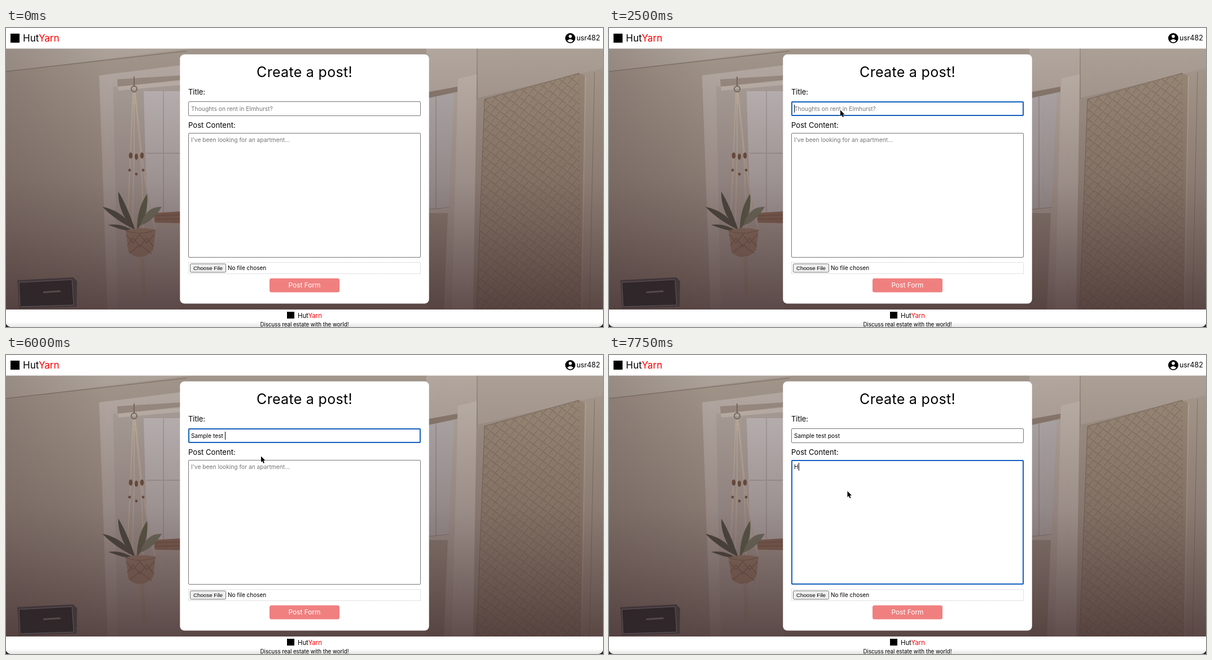
Write an HTML page that moves like this. It is 1058x530 px and loops after 8000 ms.

```html
<!DOCTYPE html>
<html lang="en">
<head>
<meta charset="utf-8">
<title>Create a post</title>
<style>
html, body { margin: 0; width: 100%; height: 100%; overflow: hidden; background: #fff; }
#stage { position: relative; width: 1058px; height: 530px; overflow: hidden; font-family: Inter, "Open Sans", sans-serif; }
svg { position: absolute; left: 0; top: 0; display: block; }
.field {
  position: absolute; left: 323px; width: 412px; box-sizing: border-box;
  border: 1px solid #767676; border-radius: 2px; background: #fff;
  font-size: 10.25px; line-height: 14px; white-space: pre; color: #000;
}
.field div { position: absolute; left: 4px; }
#title { top: 130px; height: 26px; }
#title div { top: 5px; }
#body { top: 186px; height: 221px; }
#body div { top: 4px; }
.focus::after {
  content: ""; position: absolute; inset: -1px;
  border: 2px solid #1460bd; border-radius: 2px;
}
.empty .text { color: #757575; }
.caret { position: absolute; top: 0; width: 1px; height: 14px; background: #000; visibility: hidden; }
.empty .caret { left: 0; }
.on .caret { visibility: visible; }
#cursor { width: 10px; height: 15px; overflow: visible; }
</style>
</head>
<body>
<div id="stage">
<svg width="1058" height="530" viewBox="0 0 1058 530">
  <defs>
    <linearGradient id="shade" x2="0" y2="1">
      <stop offset="0" stop-color="#4a3434" stop-opacity=".03"/>
      <stop offset=".5" stop-color="#4a3434" stop-opacity=".31"/>
      <stop offset="1" stop-color="#402c2d" stop-opacity=".76"/>
    </linearGradient>
    <linearGradient id="side">
      <stop offset="0" stop-color="#453332" stop-opacity=".2"/>
      <stop offset="1" stop-color="#453332" stop-opacity="0"/>
    </linearGradient>
    <linearGradient id="foot" x2="0" y2="1">
      <stop offset=".7" stop-color="#fff"/>
      <stop offset="1" stop-color="#e6e6e6"/>
    </linearGradient>
    <pattern id="weave" width="17" height="17" patternUnits="userSpaceOnUse" patternTransform="skewY(-14)">
      <path d="M0 0L17 17M17 0L0 17" stroke="#857564" stroke-width="3" stroke-opacity=".6"/>
      <path d="M0 -2L17 15M17 -2L0 15" stroke="#b5a490" stroke-opacity=".5"/>
    </pattern>
  </defs>

  <!-- room -->
  <path fill="#a4988d" d="M0 36H1058V500H0Z"/>
  <path fill="#b0a69d" d="M0 36H330L0 77Z"/>
  <path stroke="#786c64" d="M0 77L320 41"/>
  <path fill="#b9afa8" d="M165 84L310 66V500H180Z"/>
  <path fill="#afa59f" d="M190 104L310 96V500H198Z"/>
  <path fill="#c3bdbd" d="M244 112H310V330H250Z"/>
  <path fill="#9c8f84" d="M197 91L310 84V92L198 104Z"/>
  <path fill="#c2b8af" d="M198 104L310 94V101L199 111Z"/>
  <path stroke="#aea5a2" stroke-width="2" fill="none" d="M279 112V330M249 222H310"/>
  <path fill="#8c6a57" d="M262 328L310 325V346L264 345Z"/>
  <path stroke="#6d5145" d="M263 333L310 331M263 339L310 338"/>
  <path fill="#b2a79e" d="M262 346H310V354L262 353Z"/>
  <path fill="#b5aaa1" d="M745 36H835V500H745Z"/>
  <path fill="#b5b0b0" d="M745 124L794 116L784 320H745Z"/>
  <path fill="#8b7c70" d="M745 114L800 104V113L745 125Z"/>
  <path stroke="#8e827b" fill="none" d="M762 122V320M745 322L785 318"/>
  <path fill="#9b8e83" d="M745 328H783L776 500H745Z"/>
  <path fill="#c0b6ad" d="M801 90L835 82L828 500H790Z"/>
  <path fill="#a3978b" d="M835 36H1058V500H828Z"/>
  <path fill="#aea399" d="M835 36H1058V72L835 124Z"/>
  <path fill="#a99c8f" d="M1024 80L1058 72V500H1016Z"/>
  <path stroke="#85786d" fill="none" d="M835 36V126M1043 78L1034 500"/>

  <!-- woven panel -->
  <path fill="#9c8c7a" d="M848 126L1016 80L1027 86L1020 500H834Z"/>
  <path fill="url(#weave)" d="M848 126L1016 80L1019 500H834Z"/>
  <path fill="none" stroke="#7c6d60" d="M834 500L848 126L1016 80"/>
  <path stroke="#b8aa9b" stroke-width="2" d="M1027 86L1020 500"/>

  <!-- hanging plant -->
  <g fill="none" stroke="#c4b5a3" stroke-width="2">
    <circle cx="227" cy="108" r="5" stroke="#7b6b5f"/>
    <path d="M227 86V103" stroke="#776a62"/>
    <path d="M225 115C222 180 220 260 214 358M229 115C237 180 240 260 264 356M227 114V225L224 355M228 115C233 160 243 240 243 356"/>
    <path d="M225 124H230M224 132H231" stroke-width="4"/>
  </g>
  <g fill="#70503f">
    <ellipse cx="221" cy="226" rx="3.3" ry="5.5"/><ellipse cx="231" cy="228" rx="3" ry="5.5"/>
    <ellipse cx="241" cy="226" rx="3.3" ry="5.5"/><circle cx="219" cy="252" r="2.4"/>
    <circle cx="231" cy="259" r="2.4"/><circle cx="243" cy="252" r="2.4"/>
  </g>
  <g fill="#474b3d">
    <path d="M229 358C219 328 208 304 199 290C198 316 211 344 229 358Z"/>
    <path d="M229 358C210 330 190 321 171 317C188 335 208 347 229 358Z"/>
    <path d="M228 360C207 348 193 347 181 349C197 355 215 361 228 360Z"/>
    <path d="M232 358C232 328 240 309 250 294C253 321 244 344 232 358Z" fill="#596149"/>
    <path d="M238 350C244 327 258 316 276 317C266 334 252 346 238 350Z" fill="#747a66"/>
  </g>
  <path fill="#9c7f6b" d="M212 359Q238 351 265 358L261 393Q239 417 217 397Z"/>
  <g fill="none" stroke="#756050" stroke-width="1.3">
    <path d="M213 366L225 381L237 366L249 381L263 366M215 386L225 372L237 388L249 372L262 388M219 399L237 384L258 400"/>
    <path d="M212 359Q238 369 265 358"/>
  </g>
  <path fill="#b09d8d" d="M238 405H245L248 468L244 477L240 471Z"/>

  <path fill="url(#side)" d="M0 36H180V500H0Z"/>
  <path fill="url(#shade)" d="M0 36H1058V500H0Z"/>

  <!-- speaker -->
  <path fill="#41363a" d="M20 447L119 442L126 449L125 494L23 497Z"/>
  <path fill="#2f2729" stroke="#64575a" d="M23 451L117 446L120 491L25 494Z"/>
  <path fill="#564a4b" d="M66 467L96 465L97 468L66 470Z"/>

  <!-- page -->
  <path fill="#fff" d="M0 0H1058V36.5H0Z"/>
  <path fill="url(#foot)" d="M0 499H1058V530H0Z"/>
  <path fill="#222" d="M0 524Q2 529 8 530H0ZM1058 524Q1056 529 1050 530H1058Z"/>
  <rect x="308.3" y="46.7" width="441.4" height="441.8" rx="8" fill="#fff"/>

  <rect x="8" y="10" width="16" height="16"/>
  <text x="30" y="24" font-size="17">Hut<tspan fill="#f00">Yarn</tspan></text>
  <circle cx="1000" cy="18" r="9"/>
  <circle cx="1000" cy="14.8" r="2.8" fill="#fff"/>
  <path fill="#fff" d="M994.5 22.5Q1000 17 1005.5 22.5Q1000 28 994.5 22.5Z"/>
  <text x="1011" y="22.3" font-size="12.4">usr482</text>

  <text x="529" y="87" font-size="25" letter-spacing=".3" text-anchor="middle">Create a post!</text>
  <text x="323" y="118" font-size="12.9">Title:</text>
  <text x="323" y="177.2" font-size="13.1">Post Content:</text>

  <rect x="323.5" y="415.5" width="411" height="20" fill="none" stroke="#c4c4c4" stroke-dasharray="1.5 1.5"/>
  <rect x="326.5" y="418" width="63" height="15" rx="2" fill="#efefef" stroke="#767676"/>
  <text x="358" y="428.7" font-size="9.75" text-anchor="middle" font-family="Liberation Sans, Arial, sans-serif">Choose File</text>
  <text x="393" y="428.7" font-size="10">No file chosen</text>
  <rect x="467" y="443.7" width="124" height="24.8" rx="3.5" fill="#f08080"/>
  <text x="529" y="460" font-size="11.9" fill="#fff" text-anchor="middle">Post Form</text>

  <rect x="498" y="503" width="13" height="12"/>
  <text x="517" y="514" font-size="11.3">Hut<tspan fill="#f00">Yarn</tspan></text>
  <text x="529" y="529" font-size="9.7" text-anchor="middle">Discuss real estate with the world!</text>
</svg>

<div class="field" id="title"><div><span class="text"></span><span class="caret"></span></div></div>
<div class="field" id="body"><div><span class="text"></span><span class="caret"></span></div></div>

<svg id="cursor" viewBox="0 0 10 15">
  <path d="M0 0V10.6L2.4 8.4L4.1 12.4L6 11.6L4.3 7.7H7.6Z" stroke="#fff" stroke-width=".9" paint-order="stroke"/>
</svg>
</div>

<script>
const LOOP = 8000;
const TITLE = "Sample test post";
const $ = id => document.getElementById(id);

// Each track is a list of [time, value]; a value holds until the next time.
const moves = [
  [0, null], [750, [670, 44]], [1000, [578.5, 105]], [1250, [470.5, 156]],
  [1500, [427.5, 146.3]], [1750, [424.5, 146.3]], [2250, [411.5, 146.5]],
  [2500, [410, 145.5]], [3000, [411.5, 150]], [3250, [452, 179.5]],
  [6750, [430, 229]], [7000, [422.5, 241.3]]
];
const typed = [
  [0, 0], [3750, 1], [4250, 3], [4750, 5], [5000, 7], [5250, 8], [5500, 9],
  [5750, 10], [6000, 12], [6250, 14], [6500, 15], [6750, 16]
];
const blink = [[0, true], [3000, false], [3500, true], [7500, false], [7750, true]];

const at = (track, t) => track.filter(k => k[0] <= t).pop()[1];

function paint(id, text, hint, focus, caret) {
  const field = $(id);
  field.className = "field" + (text ? "" : " empty") + (focus ? " focus" : "") + (caret ? " on" : "");
  field.querySelector(".text").textContent = text || hint;
}

function draw(t) {
  const pos = at(moves, t), lit = at(blink, t);
  const inTitle = t >= 2250 && t < 6750, inBody = t >= 6750;
  paint("title", TITLE.slice(0, at(typed, t)), "Thoughts on rent in Elmhurst?", t >= 2250 && t < 7000, inTitle && lit);
  paint("body", t >= 7750 ? "H" : "", "I've been looking for an apartment...", inBody, inBody && lit);
  $("cursor").style.visibility = pos ? "visible" : "hidden";
  if (pos) $("cursor").style.transform = `translate(${pos[0]}px, ${pos[1]}px)`;
}

const start = performance.now();
function tick() {
  draw((performance.now() - start) % LOOP);
  requestAnimationFrame(tick);
}
tick();
</script>
</body>
</html>
```
